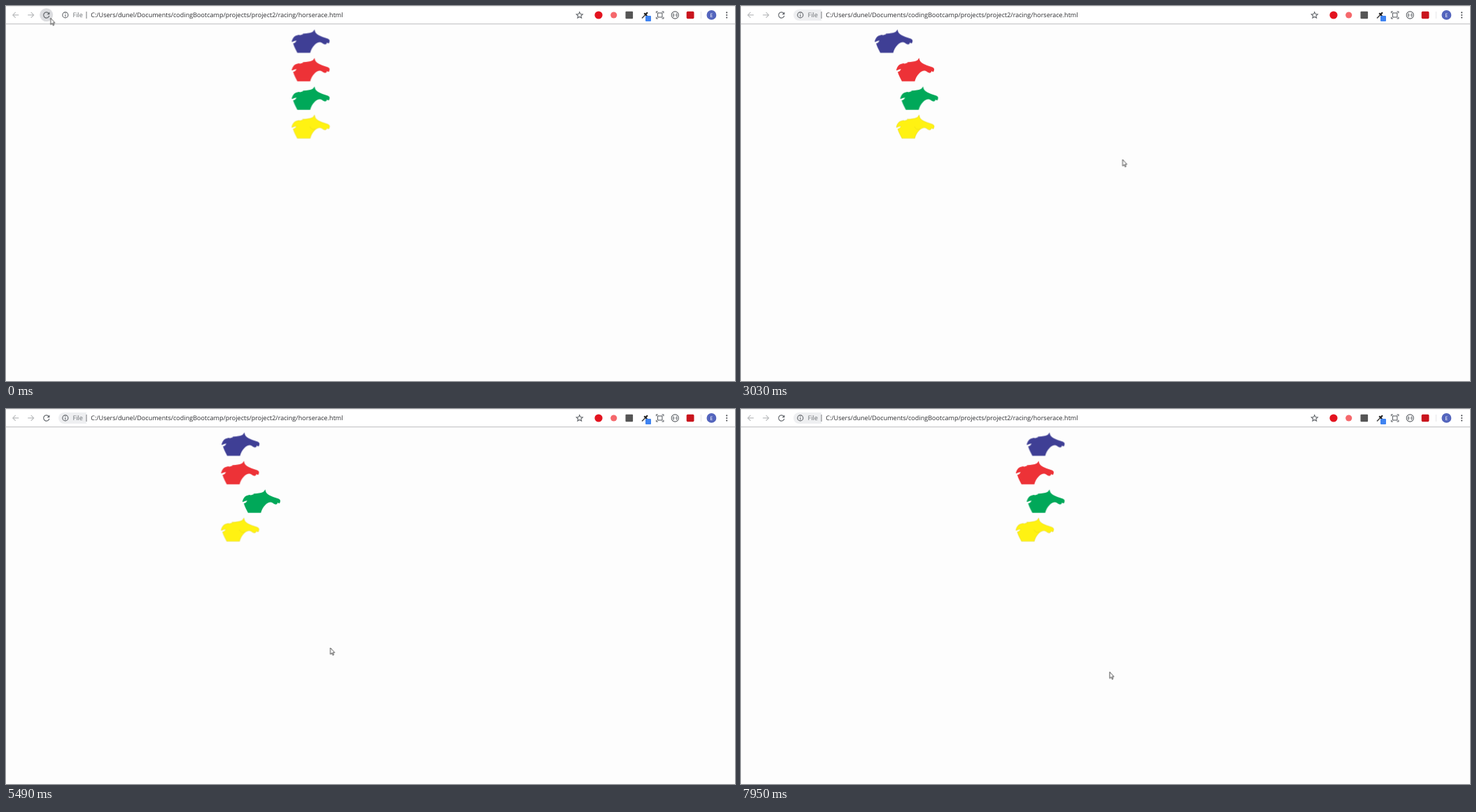
An HTML page for the animation above (8 s loop, 1042 px wide and 537 px high).

```html
<!DOCTYPE html>
<html lang="en">
<head>
<meta charset="utf-8">
<title>Horse race</title>
<style>
html, body { margin: 0; width: 100%; height: 100%; overflow: hidden; background: #fdfdfd; }
svg { display: block; width: 1042px; height: 537px; }
text { font-family: "Open Sans", "Noto Sans", sans-serif; font-size: 9.05px; text-rendering: geometricPrecision; }
.line { fill: none; stroke: #5f6368; stroke-width: 1.1; }
.off { stroke: #babcbe; }
</style>
</head>
<body>
<svg viewBox="0 0 1042 537">
  <defs>
    <path id="horse" d="M0 18.2C.5 14 3 10 6.5 9L10 8.1L12 8.4L16.5 7L15.5 6.2C20 6.5 26 5.5 29.3 4C31 3 31.8 1.6 32.5 .2C33.2 2 33.2 3.2 34.2 4.9C36.5 8 40 9.4 44 10.9L51.5 13.4C53.6 14.2 54.5 15.8 54.1 17.4L53.2 20C51.8 20.6 51.2 18.9 50 19.4C50 21 48.5 22 46.6 21.6C44 21 43 18.8 40.5 18.6C37.8 18.7 35 20 32.6 22.4C29.5 25.4 27.4 29.5 26.4 33.8H8C6.2 30 3.4 25.5 2 20.3C4.6 19.8 6.2 18 6.8 16.2C4.4 16.4 2.4 17.6 0 18.2Z"/>
  </defs>

  <!-- browser bar -->
  <rect width="1042" height="25" fill="#fff"/>
  <path d="M0 .5H1042" stroke="#eceded"/>
  <path d="M0 25.5H1042" stroke="#c9cacc"/>
  <path d="M0 26.5H1042" stroke="#f0f0f0"/>
  <circle id="hover" cx="57.7" cy="12.8" r="9.5" fill="#dcdde0"/>
  <path id="pill" d="M83 5H115V21H83A8 8 0 0 1 83 5Z" fill="#eeeff1"/>
  <path class="line off" d="M18.2 12.9H9.8M13.7 8.9L9.7 12.9L13.7 16.9M31.2 12.9H39.6M35.7 8.9L39.7 12.9L35.7 16.9"/>
  <path class="line" d="M61 10.4A4.1 4.1 0 1 0 61.8 14"/>
  <path d="M62.4 8.4V12.3H58.5Z" fill="#5f6368"/>
  <circle class="line" cx="84.8" cy="12.9" r="4"/>
  <path class="line" d="M84.8 12.4V15.2M84.8 10.4V11.5"/>
  <text x="95.6" y="16.3" fill="#6b6f73">File</text>
  <path d="M115 8V18" stroke="#77797c"/>
  <text x="121.2" y="16.3" fill="#2c2d30">C:/Users/dunel/Documents/codingBootcamp/projects/project2/racing/horserace.html</text>

  <path class="line" d="M819.8 8.6L821.1 11.6L824.3 11.9L821.9 14L822.6 17.2L819.8 15.5L817 17.2L817.7 14L815.3 11.9L818.5 11.6Z"/>
  <circle cx="847" cy="13" r="5.6" fill="#e3131f"/>
  <circle cx="868.7" cy="13" r="4.6" fill="#f5686c"/>
  <rect x="885.5" y="7.7" width="10.6" height="10.6" rx="1" fill="#555"/>
  <path d="M909 17.5L914.2 12.2" stroke="#444" stroke-width="1.6"/>
  <path d="M912.2 10.2L916.2 14.2M914.5 11.8L917 9.3" stroke="#222" stroke-width="2.2"/>
  <rect x="914" y="14" width="8" height="8" rx="1" fill="#3f83f1"/>
  <rect class="line" x="931.5" y="10" width="6.4" height="6"/>
  <path class="line" d="M929.5 10.3V8H932M937.4 8H939.9V10.3M939.9 15.7V18H937.4M932 18H929.5V15.7"/>
  <circle class="line" cx="956.3" cy="13" r="5.1"/>
  <path class="line" d="M954.6 10.6Q952.6 13 954.6 15.4M958 10.6Q960 13 958 15.4M955.6 13H957"/>
  <rect x="972.7" y="7.8" width="10.8" height="10.4" rx="1.6" fill="#c9141d"/>
  <path d="M993.5 8V18" stroke="#e6e7e8"/>
  <circle cx="1008.4" cy="12.9" r="6.9" fill="#5465bd"/>
  <text x="1008.4" y="15.6" fill="#fff" text-anchor="middle" style="font-size:7.4px">E</text>
  <path d="M1030.2 9.4h0m0 3.6h0m0 3.6h0" stroke="#55585c" stroke-width="2.2" stroke-linecap="round"/>

  <g id="field"></g>
  <path id="cursor" d="M0 0V9.3L2.1 7.4L3.5 10.6L4.9 10L3.5 6.9H6.2Z" fill="#fff" stroke="#333" stroke-width=".85"/>
</svg>
<script>
const LOOP = 8000, FIRST = 83, STEP = 77.1;  // ms
const GATE = 8, FINISH = 408.4;              // px
const $ = id => document.getElementById(id);
const clamp = (v, lo = 0, hi = 1) => Math.min(hi, Math.max(lo, v));
const progress = (t, from, to) => clamp((t - from) / (to - from));

// The screen refreshes at a fixed step; every pose is a function of time.
const ticks = [0];
for (let t = FIRST; t < LOOP - STEP / 2; t += STEP) ticks.push(t);

function play(el, pose) {
  const frames = ticks.map(t => ({ offset: t / LOOP, easing: "step-end", ...pose(t) }));
  frames.push({ ...frames[frames.length - 1], offset: 1 });
  el.animate(frames, { duration: LOOP, iterations: Infinity });
}

const place = (x, y) => ({ transform: `translate(${x.toFixed(2)}px, ${y.toFixed(2)}px)` });

// Wait at the gate, sprint, settle, then hold a steady pace to the finish.
function run(t, { sprint, settle, cruise, pace }) {
  if (t < FIRST) return FINISH;
  const x = GATE + (sprint - GATE) * progress(t, 560, 860)
    + (settle - sprint) * progress(t, 860, 1710)
    + (cruise - settle) * progress(t, 1710, 3030)
    + pace * Math.max(0, t - 3030);
  return Math.min(x, FINISH);
}

const slow = { sprint: 132, settle: 166.3, cruise: 222.7, pace: .0346 };
const horses = [
  { color: "#3f3f95", sprint: 87, settle: 122, cruise: 192, pace: .0474 },
  { color: "#ed3237", ...slow },
  { color: "#00a859", ...slow, cruise: 228.4, pace: .0447 },
  { color: "#fff212", ...slow, edge: "#d8cb2a" }
];

horses.forEach((horse, row) => {
  const g = document.createElementNS("http://www.w3.org/2000/svg", "g");
  const { color, edge = "none" } = horse;
  g.innerHTML = `<g stroke="${edge}" stroke-width=".4"><use href="#horse" fill="${color}"/>
    <path d="M26 17Q29 23 34 20" fill="none"/></g>`;
  $("field").append(g);
  play(g, t => place(run(t, horse), 33.3 + row * 40.8));
});

// Pointer strokes: start, end, x, y. Each one slows towards its end.
const strokes = [
  [1150, 1450, 77.3, 18.3],
  [1860, 3030, 545.5, 219.8],
  [3030, 3450, 574.5, 246],
  [3450, 4640, 412.6, 313.3],
  [5110, 6410, 502.5, 363.9],
  [6410, 7300, 527, 376.5]
];

play($("cursor"), t => {
  let x = 63.8, y = 17.3;
  for (const [from, to, nx, ny] of strokes) {
    const k = 1 - (1 - progress(t, from, to)) ** 2.5;
    x += (nx - x) * k;
    y += (ny - y) * k;
  }
  return place(x, y);
});
play($("hover"), t => ({ opacity: 1 - progress(t, 0, 1330) }));
play($("pill"), t => ({ opacity: progress(t, 1330, 1560) }));
</script>
</body>
</html>
```
